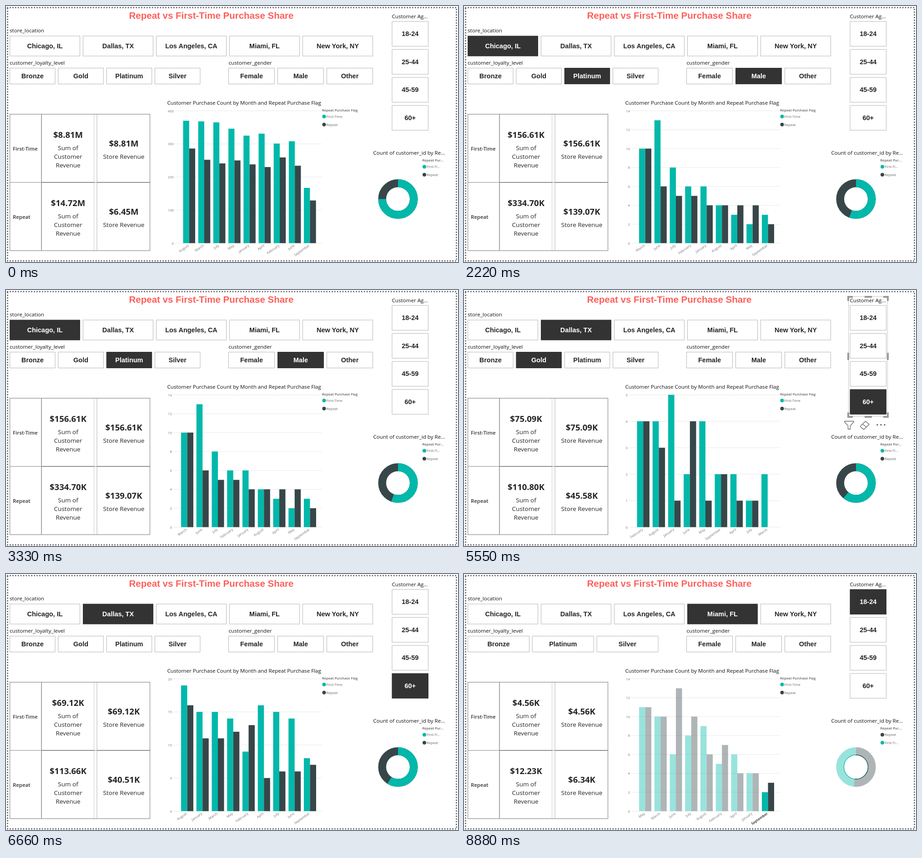
Recreate the animation shown at these times as an HTML page. Size 994 by 563 pixels, loop 9990 ms.

```html
<!DOCTYPE html>
<html lang="en">
<head>
<meta charset="utf-8">
<title>Repeat vs First-Time Purchase Share</title>
<style>
html, body { margin: 0; width: 100%; height: 100%; overflow: hidden; background: #fff; }
svg { display: block; width: 994px; height: 563px; font-family: "Open Sans", "Noto Sans", sans-serif; }
.mid { text-anchor: middle; }
.end { text-anchor: end; }
.title { font: bold 20.5px "Liberation Sans", Arial, sans-serif; fill: #fd5f5b; }
.btn { font: bold 14.5px "Liberation Sans", Arial, sans-serif; fill: #252423; }
.on { fill: #fff; }
.label { font-size: 11.62px; fill: #111; }
.value { font-size: 18.5px; font-weight: 700; fill: #252423; }
.note { font-size: 13.5px; fill: #252423; }
.head { font-size: 11.4px; font-weight: 600; fill: #333; }
.key { font-size: 7.7px; fill: #666; }
.keyhead { font-size: 7.6px; font-weight: 600; fill: #605e5c; }
.tick { font-size: 7.7px; fill: #777; }
.strong { font-weight: 700; fill: #444; }
.state { visibility: hidden; animation: show 9.99s step-end infinite; }
@keyframes show {
  0% { visibility: visible; }
  11.1111%, 100% { visibility: hidden; }
}
</style>
</head>
<body>
<svg id="stage" viewBox="0 0 994 563"></svg>
<script>
const TEAL = '#01b8aa', DARK = '#374649', SLOT = 1.11;
const names = { First: 'First-Time', Repeat: 'Repeat' };

const text = (x, y, cls, s, extra = '') => `<text x="${x}" y="${y}" class="${cls}" ${extra}>${s}</text>`;
const rect = (x, y, w, h, fill, extra = '') =>
  `<rect x="${x}" y="${y}" width="${w}" height="${h}" fill="${fill}" ${extra}/>`;
const line = (x1, y1, x2, y2, color, w = 1) =>
  `<path d="M${x1} ${y1}L${x2} ${y2}" stroke="${color}" stroke-width="${w}"/>`;
const dot = (x, y, r, fill) => `<circle cx="${x}" cy="${y}" r="${r}" fill="${fill}"/>`;

function button(x, y, w, h, label, picks) {
  const on = picks.includes(label);
  const box = on ? rect(x, y, w, h, '#333')
    : rect(x + .5, y + .5, w - 1, h - 1, '#fff', 'stroke="#b5b5b5"');
  return box + text(x + w / 2, y + h / 2 + 5, 'btn mid' + (on ? ' on' : ''), label);
}

// Buttons share a row of the given width
function row(x, y, width, h, gap, labels, picks) {
  const w = (width - gap * (labels.length - 1)) / labels.length;
  return labels.map((s, i) => button(x + i * (w + gap), y, w, h, s, picks)).join('');
}

function slicers({ picks, levels = ['Bronze', 'Gold', 'Platinum', 'Silver'] }) {
  const cities = ['Chicago, IL', 'Dallas, TX', 'Los Angeles, CA', 'Miami, FL', 'New York, NY'];
  const ages = ['18-24', '25-44', '45-59', '60+'];
  return row(8, 65.5, 799, 45, 6, cities, picks)
    + row(8, 136, 419.5, 36, 5.8, levels, picks)
    + row(489, 136, 318, 36, 6, ['Female', 'Male', 'Other'], picks)
    + ages.map((s, i) => button(848.5, 33.5 + i * 61.6, 80.5, 55.5, s, picks)).join('');
}

function chart({ max, tick, base = 521.5, gridX, x, step, months, first, repeat, hi = -1, flat }) {
  const top = 230.5, bar = step * .4, scale = (base - top) / max;
  let out = '';
  for (let v = 0; v <= max; v += tick) {
    const y = base - v * scale;
    out += line(gridX, y, 695, y, '#e9e9e9') + text(gridX - 3, y + 3, 'tick end', v);
  }
  months.split(' ').forEach((m, i) => {
    const left = x + i * step, cx = left + bar;
    const fade = hi >= 0 && hi !== i ? 'opacity=".4"' : '';
    [[first[i], left, TEAL], [repeat[i], cx, DARK]].forEach(([v, bx, c]) => {
      if (v) out += rect(bx, base - v * scale, bar, v * scale, c, fade);
    });
    const cls = hi === i ? 'tick strong' : 'tick';
    out += flat ? text(cx, 550, cls + ' mid', m)
      : text(cx, 528, cls + ' end', m, `transform="rotate(-35 ${cx} 528)"`);
  });
  return out;
}

function ring(r, w, share, a, b) {
  const arc = (color, dash) => `<circle cx="862" cy="424.5" r="${r}" fill="none" stroke="${color}"
    stroke-width="${w}" pathLength="100" ${dash} transform="rotate(-90 862 424.5)"/>`;
  return arc(b, '') + arc(a, `stroke-dasharray="${share} ${100 - share}"`);
}

function donut({ share, lead = 'First', glow = 0, hi = -1 }) {
  const order = lead === 'First' ? [TEAL, DARK] : [DARK, TEAL];
  const pale = { [TEAL]: '#99e3dd', [DARK]: '#afb5b6' };
  const keys = order.map((c, i) => dot(920, 353.5 + i * 17.5, 4, c)
    + text(925, 356 + i * 17.5, 'key', c === TEAL ? 'First-Ti...' : 'Repeat')).join('');
  const shades = hi >= 0 ? order.map(c => pale[c]) : order;
  return keys + ring(34.75, 17.5, share, ...shades)
    + (glow ? ring(26 + glow / 2, glow, share, ...order) : '');
}

const values = ({ money }) => money.map((v, i) => {
  const dy = i > 1 ? 150 : 0;
  return i % 2 ? text(259, 308.5 + dy, 'value mid', '$' + v) : text(136.5, 290 + dy, 'value mid', '$' + v);
}).join('');

function focus() {
  const grip = 'fill="none" stroke="#999" stroke-width="4"';
  const icon = 'fill="none" stroke="#666" stroke-width="1.3" stroke-linejoin="round"';
  return rect(845.5, 14.5, 86, 264, 'none', 'stroke="#c8c8c8"')
    + `<path ${grip} d="M845 24V15H855M922 15H932V24M845 269V279H855M922 279H932V269
      M881 15H897M881 279H897M845 138V154M932 138V154"/>`
    + `<path ${icon} d="M837 288.5H857V290.5L849.5 298.5V306H844.5V298.5L837 290.5Z"/>`
    + `<path ${icon} d="M872 299L883 288.500L891 295.500L880.500 306H877.500L872 300.500ZM876.500 295L885 301.500"/>`
    + [909, 917, 925].map(x => dot(x, 296.5, 1.7, '#666')).join('');
}

function frame() {
  let out = rect(3.5, 3.5, 987, 557, 'none',
    'stroke="#585858" stroke-width="3" stroke-linecap="round" stroke-dasharray="0 5.9"');
  out += text(451.5, 27.5, 'title mid', 'Repeat vs First-Time Purchase Share');
  [[8, 58, 'store_location'], [8, 129, 'customer_loyalty_level'], [489.5, 129, 'customer_gender'],
    [848.5, 27, 'Customer Ag...'], [807.5, 327, 'Count of customer_id by Re...'],
    [354.5, 217, 'Customer Purchase Count by Month and Repeat Purchase Flag']]
    .forEach(([x, y, s]) => out += text(x, y, 'label', s));

  out += text(695, 232, 'keyhead', 'Repeat Purchase Flag') + text(915.5, 342, 'keyhead', 'Repeat Pur...');
  out += dot(699.5, 243, 4, TEAL) + text(704.5, 245.8, 'key', names.First);
  out += dot(699.5, 260.7, 4, DARK) + text(704.5, 263.5, 'key', names.Repeat);

  out += line(193.5, 238, 193.5, 538, '#ccc') + line(200, 238, 200, 538, '#b0b0b0');
  out += rect(8.5, 238, 308, 300, 'none', 'stroke="#a0a0a0" stroke-width="1.5"');
  out += line(8, 388, 317, 388, '#a8a8a8', 1.5) + line(78, 388, 194, 388, '#929292', 2);
  out += line(200, 388, 317, 388, '#929292', 2) + line(78, 238, 78, 538, '#999', 1.7);
  [names.First, names.Repeat].forEach((s, i) => {
    const y = i * 150;
    out += text(15, 318 + y, 'head', s) + text(259, 335.5 + y, 'note mid', 'Store Revenue');
    ['Sum of', 'Customer', 'Revenue'].forEach((w, j) => out += text(136.5, 316.5 + j * 19 + y, 'note mid', w));
  });
  return out;
}

const all = {
  picks: [], money: ['8.81M', '8.81M', '14.72M', '6.45M'], share: 75,
  max: 400, tick: 100, gridX: 372, x: 389.5, step: 33.2,
  months: 'August March July May January April February June September',
  first: [370, 368, 365, 346, 325, 331, 301, 308, 167],
  repeat: [286, 252, 241, 250, 238, 230, 259, 234, 129]
};
const chicago = {
  picks: ['Chicago, IL', 'Platinum', 'Male'], money: ['156.61K', '156.61K', '334.70K', '139.07K'], share: 55.6,
  max: 14, tick: 2, gridX: 368, x: 385, step: 33.75,
  months: 'March June July February January August April May September',
  first: [10, 13, 8, 6, 6, 4, 3, 2, 3],
  repeat: [10, 6, 5, 5, 4, 4, 4, 4, 2]
};
const angeles = {
  picks: ['Los Angeles, CA', 'Gold', 'Female', '18-24'], money: ['21.03K', '21.03K', '70.09K', '27.27K'],
  share: 57.1, lead: 'Repeat',
  max: 3, tick: 1, base: 539, gridX: 363, x: 384.5, step: 43.17, flat: true,
  months: 'May August February March January July June',
  first: [1, 3, 1, 0, 0, 0, 1],
  repeat: [3, 0, 1, 2, 1, 1, 0]
};
const dallas = {
  picks: ['Dallas, TX', 'Gold', '60+'], money: ['75.09K', '75.09K', '110.80K', '45.58K'], share: 61, focus: true,
  max: 5, tick: 1, gridX: 363, x: 380.5, step: 34.2,
  months: 'February August January June May September April July March',
  first: [4, 4, 5, 2, 4, 2, 2, 1, 2],
  repeat: [4, 3, 1, 4, 1, 2, 1, 1, 0]
};
const seniors = {
  picks: ['Dallas, TX', '60+'], money: ['69.12K', '69.12K', '113.66K', '40.51K'], share: 59,
  max: 20, tick: 5, gridX: 368, x: 385, step: 33.75,
  months: 'August January March May February April July June September',
  first: [19, 15, 15, 14, 9, 16, 15, 14, 8],
  repeat: [16, 11, 11, 12, 13, 5, 6, 6, 7]
};
const miami = {
  picks: ['Miami, FL', '18-24'], levels: ['Bronze', 'Platinum', 'Silver'],
  money: ['4.56K', '4.56K', '12.23K', '6.34K'], share: 51.8, lead: 'Repeat', hi: 8, glow: 1.2,
  max: 14, tick: 2, gridX: 368, x: 385, step: 33.75,
  months: 'May March June July August February April January September',
  first: [11, 10, 6, 8, 9, 5, 6, 4, 2],
  repeat: [11, 10, 13, 10, 6, 7, 4, 4, 3]
};

const states = [all, { ...all, picks: ['Chicago, IL'] }, chicago, chicago, angeles, dallas,
  seniors, { ...seniors, hi: 0, glow: 4 }, miami];

document.getElementById('stage').innerHTML = frame() + states.map((s, i) => {
  const delay = -((states.length - i) % states.length) * SLOT;
  return `<g class="state" style="animation-delay:${delay.toFixed(2)}s">`
    + slicers(s) + values(s) + chart(s) + donut(s) + (s.focus ? focus() : '') + '</g>';
}).join('');
</script>
</body>
</html>
```
